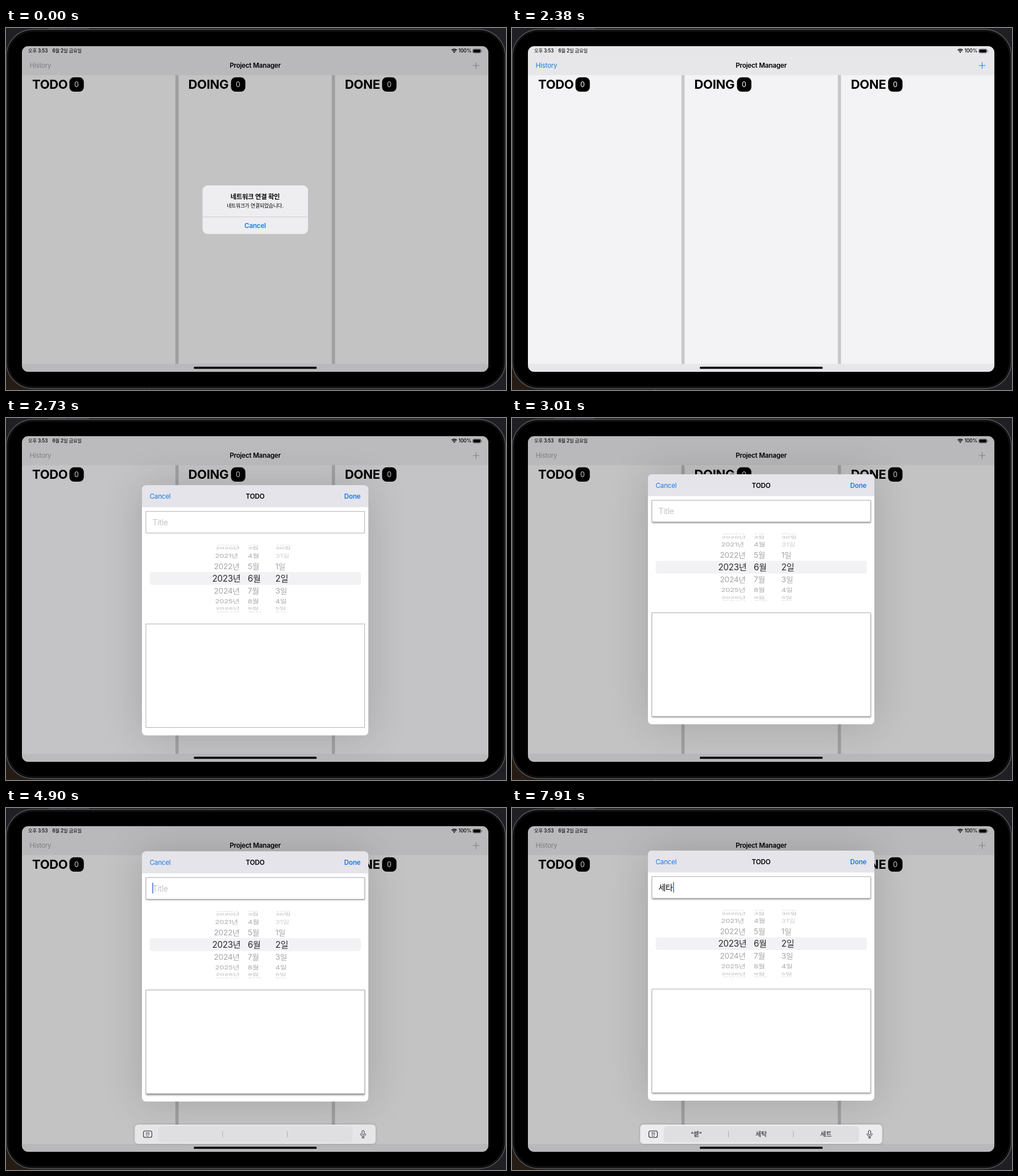
Animation, 879 px wide and 637 px high, one loop 8000 ms. Source, as an HTML page with a canvas:

```html
<!DOCTYPE html>
<html lang="ko">
<head>
<meta charset="utf-8">
<title>Project Manager</title>
<style>
  html, body { margin: 0; width: 100%; height: 100%; overflow: hidden; background: #000; }
  canvas { display: block; }
</style>
</head>
<body>
<canvas id="stage" width="879" height="637"></canvas>
<script>
const ctx = document.getElementById('stage').getContext('2d');
const FONT = 'Inter, "Noto Sans CJK KR", "Noto Sans CJK", sans-serif';
const LOOP = 8000, STEP = 70;
const BLUE = [27, 124, 229], GREY = [158, 158, 162];
const LINK = `rgb(${BLUE})`;

// Remaining distance of a critically damped spring, 1 -> 0.
function spring(t, start) {
  const x = Math.max(0, t - start) * 0.01495;
  return (1 + x) * Math.exp(-x);
}

const mix = (a, b, k) => `rgb(${a.map((v, i) => Math.round(v + (b[i] - v) * k))})`;

function rect(x, y, w, h, color) {
  ctx.fillStyle = color;
  ctx.fillRect(x, y, w, h);
}

function round(x, y, w, h, r, color) {
  ctx.beginPath();
  ctx.roundRect(x, y, w, h, r);
  if (color) {
    ctx.fillStyle = color;
    ctx.fill();
  }
}

function text(str, x, y, size, color = '#000', weight = 400, align = 'left', track = -0.02) {
  ctx.font = `${weight} ${size}px ${FONT}`;
  ctx.letterSpacing = `${track * size}px`;
  ctx.textAlign = align;
  ctx.fillStyle = color;
  ctx.fillText(str, x, y);
}

function line(points, color, width) {
  ctx.beginPath();
  points.forEach(([x, y], i) => i ? ctx.lineTo(x, y) : ctx.moveTo(x, y));
  ctx.strokeStyle = color;
  ctx.lineWidth = width;
  ctx.stroke();
}

function drawDevice() {
  rect(0, 0, 879, 637, '#1f1f24');
  rect(0, 590, 60, 47, '#241c15');
  rect(75, 0, 34, 2, '#3c3c40');
  rect(111, 0, 35, 2, '#3c3c40');
  rect(362, 0, 1, 3, '#34343a');
  text('Sample note about the list', 249, 643, 9, '#4a4642');
  round(0.5, 2.5, 877.5, 632, 47, '#0c0c0d');
  ctx.strokeStyle = '#58595b';
  ctx.lineWidth = 1.4;
  ctx.stroke();
  round(3.5, 5.5, 871.5, 626, 44, '#000');
  ctx.strokeStyle = '#1b1b1c';
  ctx.lineWidth = 1;
  ctx.stroke();
}

function drawStatus() {
  text('오후 3:53', 39, 43.2, 8.3, '#000', 500);
  text('6월 2일 금요일', 81.5, 43.2, 8.3, '#000', 500);
  text('100%', 795.5, 43.3, 8.6, '#000', 500);
  ctx.strokeStyle = '#000';
  ctx.lineWidth = 1.4;
  for (const r of [3.8, 6.4]) {
    ctx.beginPath();
    ctx.arc(788, 43.6, r, -Math.PI * 0.75, -Math.PI * 0.25);
    ctx.stroke();
  }
  ctx.beginPath();
  ctx.moveTo(788, 44);
  ctx.arc(788, 43.8, 2.2, -Math.PI * 0.75, -Math.PI * 0.25);
  ctx.fill();
  round(820.5, 36.9, 14.5, 7.2, 2.2);
  ctx.strokeStyle = '#666';
  ctx.lineWidth = 0.7;
  ctx.stroke();
  round(821.4, 37.8, 12.7, 5.4, 1.4, '#000');
  round(835.8, 39.3, 1, 2.4, 0.5, '#666');
}

function drawBoard(dim, pressed) {
  rect(28, 32, 820, 573, '#e7e7ea');
  rect(28, 83, 820, 508, '#f3f3f5');
  rect(297.8, 83, 5.6, 508, '#c7c7c9');
  rect(572.8, 83, 5.6, 508, '#c7c7c9');
  drawStatus();

  const tint = mix(BLUE, GREY, dim);
  text('History', 41.5, 70, 11.7, tint);
  text('Project Manager', 438, 69.8, 11.7, '#000', 600, 'center');
  ctx.globalAlpha = pressed ? 0.3 : 1;
  line([[820.7, 66], [832.3, 66]], tint, 1.1);
  line([[826.5, 60.2], [826.5, 71.8]], tint, 1.1);
  ctx.globalAlpha = 1;

  for (const [name, x, bx] of [['TODO', 46, 111.5], ['DOING', 320.5, 395.5], ['DONE', 595.8, 661.2]]) {
    text(name, x, 107.3, 22, '#000', 700, 'left', -0.015);
    round(bx, 86.8, 25.3, 25.2, 8, '#000');
    text('0', bx + 12.5, 104.2, 12.6, '#fff', 400, 'center', 0);
  }
  rect(28, 32, 820, 573, `rgba(0,0,0,${0.2 * dim})`);
}

function drawAlert(alpha) {
  ctx.globalAlpha = alpha;
  round(345.5, 277, 185.5, 85.5, 9, '#eeeef1');
  rect(345.5, 332, 185.5, 0.8, '#c6c6c9');
  text('네트워크 연결 확인', 438, 301.3, 11.3, '#000', 600, 'center');
  text('네트워크가 연결되었습니다.', 438, 315.6, 8.8, '#000', 400, 'center');
  text('Cancel', 438, 352, 11.7, LINK, 600, 'center');
  ctx.globalAlpha = 1;
}

function drawField(y, h, shaded) {
  ctx.save();
  if (shaded) {
    ctx.shadowColor = 'rgba(0,0,0,.5)';
    ctx.shadowBlur = 3;
    ctx.shadowOffsetY = 1.5;
  }
  rect(245.5, y, 385.5, h, '#a8a8a9');
  ctx.restore();
  rect(246.4, y + 0.9, 383.7, h - 1.8, '#fff');
}

// Date wheel: rows sit on a cylinder and flatten towards its edges.
function drawPicker(y) {
  const tones = ['#2b2b2d', '#a3a3a5', '#a8a8aa', '#b8b8ba', '#d4d4d6'];
  const zoom = [1, 0.9, 0.86, 0.84, 0.84];
  const shift = [0, 3, 5, 6, 7];
  round(252.5, y - 11.3, 371.5, 22.6, 4.5, '#f2f2f4');
  for (let i = -4; i <= 4; i++) {
    const n = Math.abs(i), angle = i * 0.377, size = 15.2 * zoom[n];
    const day = (i + 32) % 31 + 1;
    ctx.save();
    ctx.translate(0, y + Math.sin(angle) * 58.6);
    ctx.scale(1, Math.max(0.14, Math.cos(angle)));
    text(`${2023 + i}년`, 362.5 + shift[n], size * 0.37, size, tones[n]);
    text(`${6 + i}월`, 425, size * 0.37, size, tones[n]);
    text(`${day}일`, 473.5, size * 0.37, size, day === 31 ? '#d0d0d2' : tones[n]);
    ctx.restore();
  }
}

function drawSheet(top, typed, cursor, shaded) {
  ctx.save();
  ctx.shadowColor = 'rgba(0,0,0,.16)';
  ctx.shadowBlur = 72;
  round(239, top, 398, 440, 7, '#fff');
  ctx.restore();
  round(239, top, 398, 38.5, [7, 7, 0, 0], '#e5e4ea');
  text('Cancel', 252.5, top + 23.6, 11.7, LINK);
  text('TODO', 438, top + 23.6, 11.7, '#000', 600, 'center');
  text('Done', 623.3, top + 23.6, 11.7, LINK, 600, 'right');

  drawField(top + 45.3, 39, shaded);
  text(typed || 'Title', 257.5, top + 70, 14, typed ? '#000' : '#c4c4c6');
  if (cursor) {
    const x = typed ? 257.5 + ctx.measureText(typed).width + 0.6 : 257.3;
    round(x, top + 55, 1.5, 19, 0.7, '#3e6bd0');
  }
  drawPicker(top + 163.8);
  drawField(top + 243.3, 183.2, shaded);
}

function drawBar(rest, words) {
  ctx.save();
  ctx.globalAlpha = 1 - rest;
  ctx.translate(438, 574);
  ctx.scale(1 - 0.07 * rest, 1 - 0.07 * rest);
  ctx.translate(-438, -574);
  ctx.save();
  ctx.shadowColor = 'rgba(0,0,0,.2)';
  ctx.shadowBlur = 4;
  round(225.3, 557, 425.5, 34, 6, '#ececee');
  ctx.restore();
  round(266.5, 559.8, 343.5, 28.4, 6, '#dfdfe1');
  rect(380, 568.5, 0.9, 11, '#a2a2a4');
  rect(494.3, 568.5, 0.9, 11, '#a2a2a4');

  round(240.6, 568.2, 15, 11.6, 3);
  ctx.strokeStyle = '#222';
  ctx.lineWidth = 1.1;
  ctx.stroke();
  text('한', 248.1, 577, 8, '#222', 500, 'center', 0);

  round(626.7, 567.4, 4, 8, 2);
  ctx.lineWidth = 1;
  ctx.stroke();
  ctx.beginPath();
  ctx.moveTo(624.3, 572.6);
  ctx.arc(628.7, 573.6, 4.4, Math.PI, 0, true);
  ctx.lineTo(633.1, 572.6);
  ctx.moveTo(628.7, 578);
  ctx.lineTo(628.7, 580.6);
  ctx.moveTo(626.3, 580.6);
  ctx.lineTo(631.1, 580.6);
  ctx.stroke();

  words.split(' ').forEach((word, i) => {
    text(word, [323.8, 438, 552][i], 577.6, 11, '#111', 400, 'center');
  });
  ctx.restore();
}

// [time, typed text, suggestions]
const TYPING = [
  [0, '', ''],
  [5460, 'ㅅ', '“ㅅ” 사 수'],
  [5740, '', '“ㅅ” 사 수'],
  [6020, '', ''],
  [6370, 'ㅅ', '“ㅅ” 사 수'],
  [6440, '세', '“세” 세상 세트'],
  [6790, '', '“세” 세상 세트'],
  [7000, '', ''],
  [7350, 'ㅅ', '“ㅅ” 사 수'],
  [7490, '세', '“세” 세상 세트'],
  [7630, '셑', '“세” 세상 세트'],
  [7770, '셑', '“셑” 세탁 세트'],
  [7910, '세타', '“셑” 세탁 세트'],
];

function draw(t) {
  const alert = spring(t, 976);
  const sheet = spring(t, 2394);
  const bar = spring(t, 4609);
  const [, typed, words] = TYPING.findLast(step => step[0] <= t);

  drawDevice();
  ctx.save();
  round(28, 32, 820, 573, 11);
  ctx.clip();
  drawBoard(t < 2000 ? alert : 1 - sheet, t >= 2100 && t < 2310);
  if (t < 1470) drawAlert(alert);
  if (sheet < 1) {
    drawSheet(98.5 + 506.5 * sheet - 23.5 * (1 - bar), typed, t >= 4480, t >= 2940);
  }
  if (bar < 1) drawBar(bar, words);
  round(330, 596, 216.3, 3.8, 1.9, '#050506');
  ctx.restore();
}

function tick() {
  const t = performance.now() % LOOP;
  draw(Math.floor(t / STEP) * STEP);
  requestAnimationFrame(tick);
}
tick();
</script>
</body>
</html>
```
